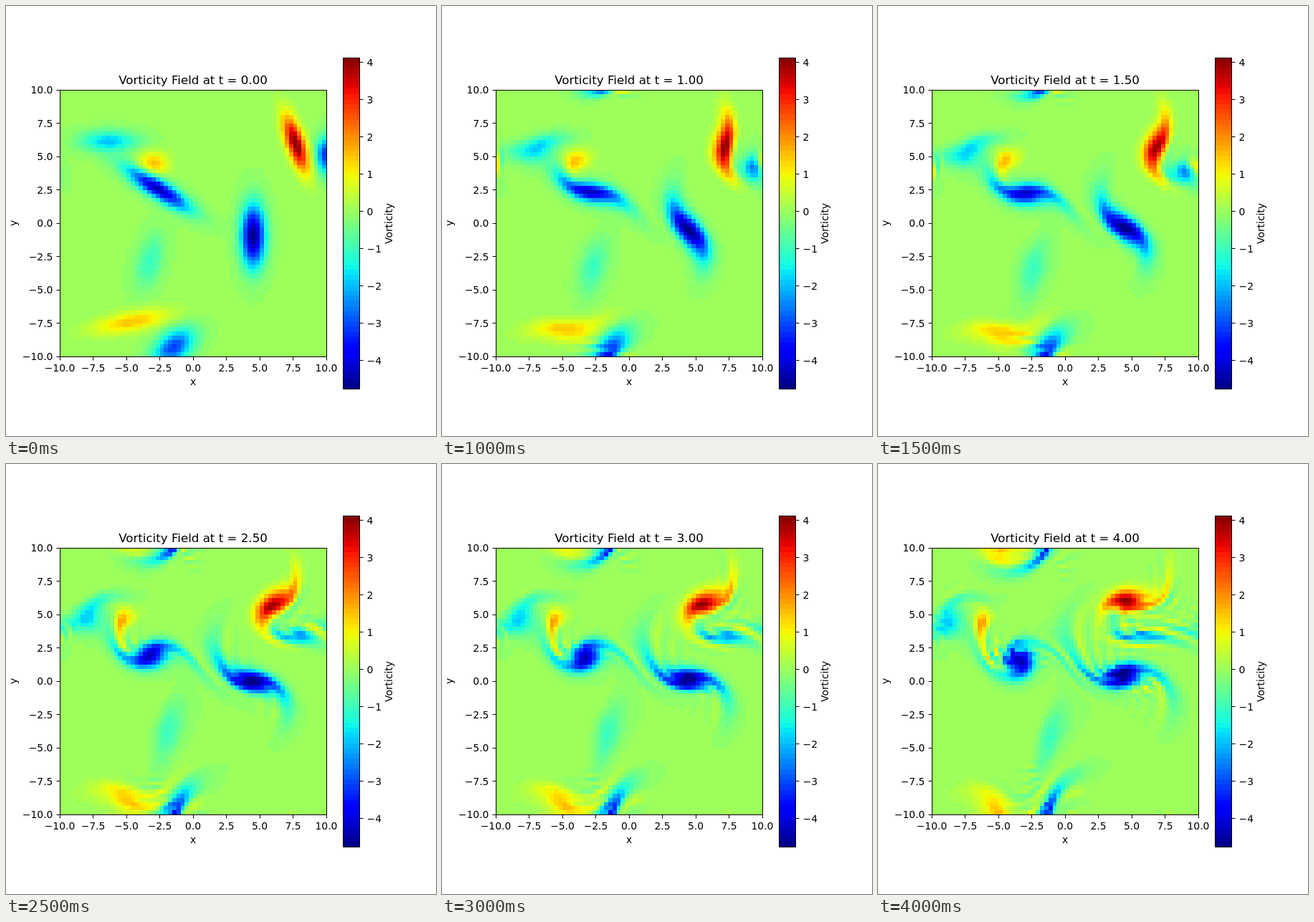
Write an HTML page with a canvas that moves like this. It is 600 by 600 pixels and loops after 4.5 s.

```html
<!DOCTYPE html>
<html lang="en">
<head>
<meta charset="utf-8">
<title>Vorticity Field</title>
<style>
  html, body { margin: 0; width: 100%; height: 100%; overflow: hidden; background: #fff; }
  canvas, svg { position: absolute; }
  canvas { image-rendering: pixelated; }
  #field { left: 75px; top: 117px; width: 372px; height: 372px; }
  #bar { left: 470px; top: 72px; width: 23px; height: 462px; }
  svg { left: 0; top: 0; font: 13.89px "DejaVu Sans", sans-serif; }
  path { fill: none; stroke: #000; }
</style>
</head>
<body>
<canvas id="field" width="64" height="64"></canvas>
<canvas id="bar" width="1" height="462"></canvas>
<svg id="axes" width="600" height="600" viewBox="0 0 600 600">
  <text id="title" x="261" y="108.5" font-size="16.67" text-anchor="middle"></text>
  <text x="261" y="529" text-anchor="middle">x</text>
  <text transform="translate(14.5 303) rotate(-90)" text-anchor="middle">y</text>
  <text transform="translate(539 303.5) rotate(-90)" text-anchor="middle">Vorticity</text>
  <path d="M75.5 117.5H447.5V489.5H75.5ZM470.5 72.5H493.5V534.5H470.5Z"/>
</svg>
<script>
const N = 64, SIZE = N * N, LENGTH = 20, H = LENGTH / N;
const V_MIN = -4.75, V_MAX = 4.13, VISCOSITY = 0.001;
const FRAMES = 9, FRAME_MS = 500, DT = 0.1, STEPS_PER_FRAME = 5;

// x, y, strength, sigma x, sigma y, correlation
const VORTICES = [
  [7.7, 5.95, 4.2, 0.67, 1.45, -0.66],
  [4.5, -0.95, -4.8, 0.63, 1.63, 0],
  [-2.65, 2.6, -4.4, 1.66, 1.14, -0.857],
  [-6.3, 6.15, -1.9, 1.5, 0.55, 0],
  [-3, 4.4, 1.6, 0.82, 0.65, 0],
  [-3.25, -2.85, -1.05, 0.77, 1.4, 0.4],
  [-4.65, -7.4, 1.5, 2.05, 0.65, 0.55],
  [-1.45, -9.3, -3.1, 1.08, 0.98, 0.43],
  [10.04, 5.1, -3.4, 0.55, 0.95, 0],
  [-10.2, 3.5, -0.3, 0.6, 0.7, 0]
];

function initialField() {
  return Float64Array.from({ length: SIZE }, (_, n) => {
    const px = -10 + (n % N + 0.5) * H, py = -10 + (Math.floor(n / N) + 0.5) * H;
    return VORTICES.reduce((sum, [x, y, strength, sx, sy, rho]) => {
      const a = (px - x) / sx, b = (py - y) / sy;
      return sum + strength * Math.exp(-(a * a - 2 * rho * a * b + b * b) / (2 * (1 - rho * rho)));
    }, 0);
  });
}

// The symmetric, orthonormal Hartley matrix is its own inverse.
const hartley = Float64Array.from({ length: SIZE }, (_, n) => {
  const angle = 2 * Math.PI * ((n % N) * Math.floor(n / N) % N) / N;
  return (Math.cos(angle) + Math.sin(angle)) / Math.sqrt(N);
});

const wave = k => Math.min(k, N - k) * 2 * Math.PI / LENGTH;
const inverseLaplacian = Float64Array.from({ length: SIZE }, (_, n) =>
  n ? -1 / (wave(n % N) ** 2 + wave(Math.floor(n / N)) ** 2) : 0);

function multiply(a, b) {
  const out = new Float64Array(SIZE);
  for (let i = 0; i < SIZE; i += N)
    for (let k = 0; k < N; k++) {
      const factor = a[i + k], row = k * N;
      for (let j = 0; j < N; j++) out[i + j] += factor * b[row + j];
    }
  return out;
}

const transform = f => multiply(multiply(hartley, f), hartley);
const streamFunction = w => transform(transform(w).map((v, n) => v * inverseLaplacian[n]));

function rate(w) {
  const psi = streamFunction(w), out = new Float64Array(SIZE);
  for (let j = 0; j < N; j++)
    for (let i = 0; i < N; i++) {
      const n = j * N + i;
      const west = j * N + (i + N - 1) % N, east = j * N + (i + 1) % N;
      const south = (j + N - 1) % N * N + i, north = (j + 1) % N * N + i;
      const advection = (psi[north] - psi[south]) * (w[east] - w[west])
        - (psi[east] - psi[west]) * (w[north] - w[south]);
      const laplacian = w[west] + w[east] + w[south] + w[north] - 4 * w[n];
      out[n] = (VISCOSITY * laplacian - advection / 4) / (H * H);
    }
  return out;
}

// One fourth-order Runge-Kutta step.
function step(w) {
  const shifted = (k, dt) => w.map((v, n) => v + dt * k[n]);
  const a = rate(w), b = rate(shifted(a, DT / 2));
  const c = rate(shifted(b, DT / 2)), d = rate(shifted(c, DT));
  return w.map((v, n) => v + DT / 6 * (a[n] + 2 * b[n] + 2 * c[n] + d[n]));
}

const clamp = (v, low, high) => Math.max(low, Math.min(high, v));

// The jet colour map in 64 bands.
function colour(value) {
  const band = clamp(Math.floor((value - V_MIN) / (V_MAX - V_MIN) * 64), 0, 63);
  const f = (band + 0.5) / 64;
  const red = Math.min((f - 0.35) / 0.31, 1 - (f - 0.89) / 0.22);
  const green = Math.min((f - 0.125) / 0.25, (0.91 - f) / 0.27);
  const blue = Math.min(0.5 + f / 0.22, (0.65 - f) / 0.31);
  return [red, green, blue].map(c => 255 * clamp(c, 0, 1));
}

function paint(id, width, height, valueAt) {
  const image = new ImageData(width, height);
  for (let y = 0; y < height; y++)
    for (let x = 0; x < width; x++)
      image.data.set([...colour(valueAt(x, y)), 255], 4 * (y * width + x));
  document.getElementById(id).getContext("2d").putImageData(image, 0, 0);
}

const svg = document.getElementById("axes");
function add(tag, attributes, text = "") {
  const node = document.createElementNS(svg.namespaceURI, tag);
  for (const name in attributes) node.setAttribute(name, attributes[name]);
  node.textContent = text;
  svg.append(node);
}
const label = (text, x, y, anchor) =>
  add("text", { x, y, "text-anchor": anchor }, text.replace("-", "\u2212"));

for (let i = 0; i <= 8; i++) {
  const text = (i * 2.5 - 10).toFixed(1);
  const x = 75 + 46.5 * i, y = 489 - 46.5 * i;
  add("path", { d: `M${Math.floor(x) + 0.5} 490v4.5M75 ${Math.floor(y) + 0.5}h-4.5` });
  label(text, x, 510, "middle");
  label(text, 65.4, y + 5.3, "end");
}
for (let v = -4; v <= 4; v++) {
  const y = 287 - 52 * v;
  add("path", { d: `M494 ${y - 0.5}h4.5` });
  label(String(v), 503.5, y + 5.2, "start");
}
paint("bar", 1, 462, (_, y) => V_MAX - (y + 0.5) / 462 * (V_MAX - V_MIN));

const fields = [initialField()];
while (fields.length < FRAMES) {
  let w = fields[fields.length - 1];
  for (let s = 0; s < STEPS_PER_FRAME; s++) w = step(w);
  fields.push(w);
}

const title = document.getElementById("title");
let shown = -1;
function draw() {
  const frame = Math.floor(performance.now() / FRAME_MS) % FRAMES;
  if (frame !== shown) {
    shown = frame;
    title.textContent = `Vorticity Field at t = ${(frame / 2).toFixed(2)}`;
    paint("field", N, N, (x, y) => fields[frame][(N - 1 - y) * N + x]);
  }
  requestAnimationFrame(draw);
}
draw();
</script>
</body>
</html>
```
